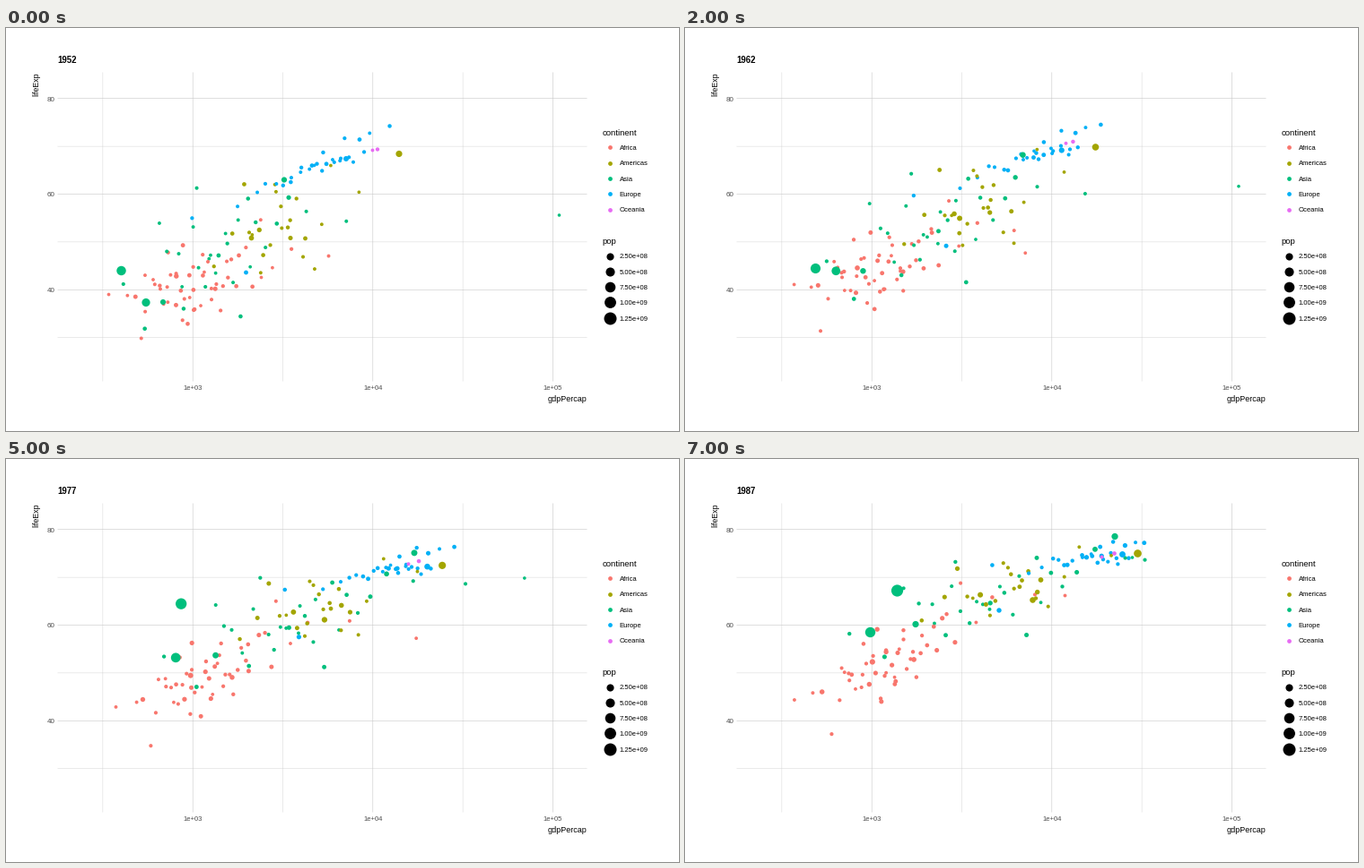
A matplotlib script that plays this animation: 750 by 450 pixels, repeating every 8 s.

```python
import numpy as np
import matplotlib
import matplotlib.pyplot as plt
from matplotlib.animation import FuncAnimation

W, H, DPI = 750, 450, 100
PT = 72 / DPI
STEPS = 8
matplotlib.rcParams["font.family"] = "Liberation Sans"

COLORS = {"Africa": "#F8766D", "Americas": "#A3A500", "Asia": "#00BF7D",
          "Europe": "#00B0F6", "Oceania": "#E76BF3"}
AF, AM, AS, EU, OC = COLORS.values()

rng = np.random.default_rng(12)
progress = np.linspace(0, 1, STEPS)
KEYS = {2: (0, 7), 3: (0, 4, 7), 4: (0, 2, 4, 7)}


def area(pop):
    """Scatter size for a population in billions."""
    return ((3.45 + 9.4 * np.sqrt(pop)) * PT) ** 2


def spread(n):
    """Evenly filled bell-shaped sample in random order."""
    p = (rng.permutation(n) + 0.5) / n
    return np.log(p / (1 - p)) / 1.8


def crowd(n, color, skew, start, end):
    """Small dots around a trend line: centre x, y, width, slope, scatter."""
    def blend(i, power=1):
        return (start[i] + (end[i] - start[i]) * progress ** power)[:, None]

    u = np.expm1(skew * spread(n)) / skew
    dx = blend(2) * u + rng.normal(0, 2, (STEPS, n))
    dy = blend(3) * dx + blend(4) * spread(n) + rng.normal(0, 1.5, (STEPS, n))
    x = np.clip(blend(0, 0.7) + dx, 103, 512)
    y = np.clip(blend(1) + dy, 92, 346)
    pop = np.exp(rng.normal(np.log(0.005), 1, n)).clip(0.0003, 0.05)
    return [(x[:, i], y[:, i], pop[i], color) for i in range(n)]


def path(color, pop, *points):
    """One dot moving evenly between a few key points."""
    x, y = (np.interp(range(STEPS), KEYS[len(points)], c) for c in zip(*points))
    return x, y, pop, color


dots = (
    crowd(51, AF, 0.18, (207, 285, 46, -0.15, 23), (226, 226, 50, -0.42, 21))
    + crowd(28, AS, 0.15, (235, 250, 55, -0.35, 36), (340, 155, 82, -0.25, 23))
    + crowd(22, AM, 0.1, (303, 221, 38, -0.6, 34), (358, 143, 50, -0.38, 19))
    + crowd(28, EU, -0.3, (350, 151, 46, -0.5, 7), (455, 108, 36, -0.2, 6.5))
)
dots = [dots[i] for i in rng.permutation(len(dots))]

# Dots that stand out from the crowd
dots += [
    path(AF, 0.001, (284, 278), (473.5, 223.5), (423, 152)),
    path(EU, 0.069, (378.5, 145.5), (460, 126.5), (487, 106)),
    path(EU, 0.022, (267, 272.5), (349.5, 168.5)),
    path(OC, 0.002, (408, 136), (464, 109)),
    path(OC, 0.009, (413.5, 135), (478, 105)),
    path(AM, 0.030, (316.5, 234), (396, 134.5)),
    path(AM, 0.057, (273, 234), (387, 157)),
    path(AM, 0.158, (437.5, 140), (476.5, 125), (504, 105)),
    path(AS, 0.0002, (616, 208.5), (617, 144), (498, 109.5)),
    path(AS, 0.082, (174.5, 305.5), (256.5, 184)),
    path(AS, 0.086, (309.5, 169), (442.5, 113.5), (478.5, 86)),
    path(AS, 0.372, (155.5, 306), (180, 235.5), (206, 193)),
    path(AS, 0.556, (128, 270.5), (145, 268), (174, 168.5), (236, 146.5)),
]

xs, ys, pops, tints = zip(*dots)
xs, ys, pops = np.array(xs), np.array(ys), np.array(pops)

fig = plt.figure(figsize=(W / DPI, H / DPI), dpi=DPI, facecolor="white")
ax = fig.add_axes([0, 0, 1, 1])
# Whole coordinates fall on pixel centres
ax.set_xlim(-0.5, W - 0.5)
ax.set_ylim(H - 0.5, -0.5)
ax.axis("off")


def label(x, y, text, size, color="black", **kw):
    return ax.text(x, y, text, fontsize=size * PT, color=color, **kw)


def grid(x, y, major):
    ax.plot(x, y, color="#c8c8c8", lw=(0.58 if major else 0.38) * PT,
            zorder=1, snap=False, solid_capstyle="butt")


def legend(y, title, rows):
    """Heading with one dot and name per row."""
    label(664, y, title, 9.5)
    for i, (name, color, size) in enumerate(rows):
        cy = y + 13.4 + 17.28 * i
        ax.scatter(672.5, cy, s=size, c=color, linewidths=0)
        label(683, cy + 2.8, name, 7.6)


for i in range(6):
    y = 78.2 + 53.4 * i
    grid((57, 647), (y, y), i % 2 == 0)
    x = 107.4 + 100.3 * i
    grid((x, x), (49, 394), i % 2 == 1)
for i in range(3):
    label(54.5, 81 + 106.8 * i, str(80 - 20 * i), 8, "#4d4d4d", ha="right")
    label(208 + 200.5 * i, 404, f"1e+0{3 + i}", 7.7, "#4d4d4d", ha="center")

title = label(57, 38.5, "", 9.7, weight="bold")
label(647, 416.5, "gdpPercap", 9, ha="right")
label(38.3, 49, "lifeExp", 8.8, rotation=90, ha="right", va="top")

legend(119.5, "continent", [(n, c, area(0.02)) for n, c in COLORS.items()])
legend(240.7, "pop", [(f"{p:.2e}", "black", area(p / 1e9))
                      for p in np.arange(1, 6) * 2.5e8])

cloud = ax.scatter(xs[:, 0], ys[:, 0], c=tints, linewidths=0, zorder=3)


def draw(step):
    cloud.set_offsets(np.column_stack((xs[:, step], ys[:, step])))
    cloud.set_sizes(area(pops * 1.019 ** (5 * step)))
    title.set_text(str(1952 + 5 * step))
    return cloud, title


anim = FuncAnimation(fig, draw, frames=STEPS, interval=1000, repeat=True, repeat_delay=0)
plt.show()
```
